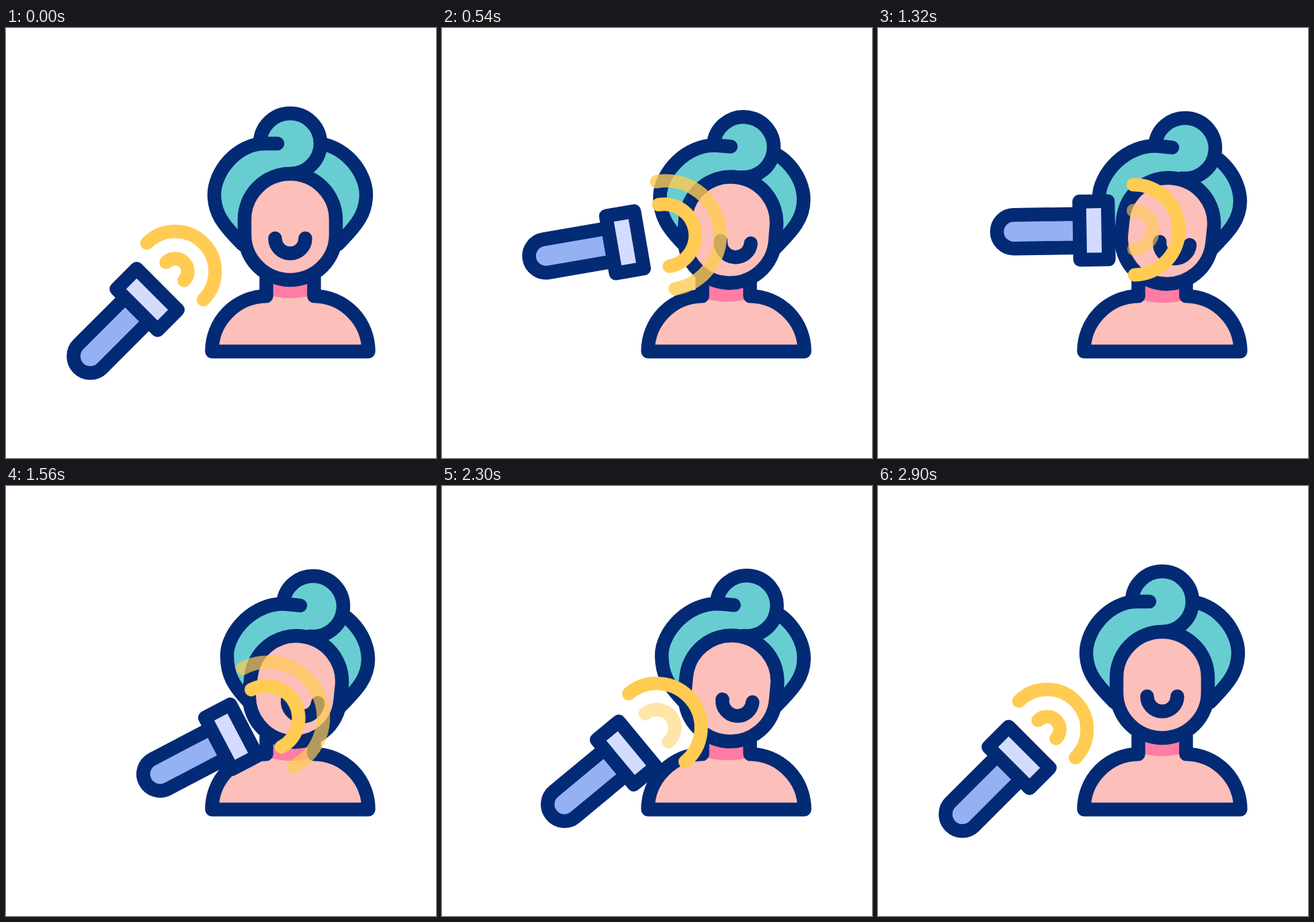
Animation of 640x640 px, one loop 3 s. Source, as an HTML page:

```html
<!DOCTYPE html>
<html lang="en">
<head>
<meta charset="utf-8">
<title>Light therapy</title>
<style>
  html, body { margin: 0; width: 100%; height: 100%; overflow: hidden; background: #fff; }
  svg { display: block; width: 100%; height: 100%; }
  .line { fill: none; stroke: #032a75; stroke-width: 20.5; stroke-linecap: round; stroke-linejoin: round; }
  .skin { fill: #fdbfba; }
  .teal { fill: #68cdd1; }
  .wave { fill: none; stroke: #ffcb52; stroke-width: 20; stroke-linecap: round; }
</style>
</head>
<body>
<svg viewBox="0 0 640 640">
  <g id="body">
    <path class="skin" d="M306.5 481.5A82 82 0 0 1 387.5 399V365H458.5V399A82 82 0 0 1 539.5 481.5Z"/>
    <path id="shade" fill="#ff7ca4" d="M388 362H458V397Q423 407 388 397Z"/>
    <path class="line" d="M387.5 372V399A82 82 0 0 0 306.5 481.5H539.5A82 82 0 0 0 458.5 399V372"/>
  </g>
  <g id="head">
    <path id="backFill" class="teal"/>
    <path id="back" class="line"/>
    <path id="frontFill" class="teal"/>
    <circle id="bunFill" class="teal" cx="423" cy="172" r="45"/>
    <path id="bun" class="line" d="M378 172A45 45 0 1 1 423 217"/>
    <path id="front" class="line"/>
    <path id="face" class="line" style="fill:#fdbfba" d="M355 285a68 68 0 0 1 136 0v22a68 68 0 0 1 -136 0z"/>
    <path id="mouth" class="line" d="M400.5 313A22.5 22.5 0 0 0 445.5 313"/>
  </g>
  <g id="wand">
    <path class="line" style="fill:#94b1f4" d="M-21 -25H-119.5A25 25 0 0 0 -119.5 25H-21Z"/>
    <rect class="line" style="fill:#d3dcff" x="-21.3" y="-43.3" width="42.6" height="86.6"/>
    <path id="outer" class="wave"/>
    <path id="inner" class="wave"/>
  </g>
</svg>
<script>
const LOOP = 3000, BEAT = 500, START = 200, STOP = 2700;
const MID = 423, TILT = 6;
const el = id => document.getElementById(id);
const clamp = v => Math.min(1, Math.max(0, v));
const ease = (t, from, length) => {
  const p = clamp((t - from) / length);
  return p * p * (3 - 2 * p);
};

// One side of the towel (side -1 left, 1 right); the near side widens as the head turns
function drawLobe(id, side, p) {
  const slope = Math.tan(TILT * Math.PI / 180) * p;
  const drop = (7 + 3 * side) * p;
  const topX = MID + 37 * side + (24 - 10 * side) * p, topY = 172 + drop;
  const edgeX = MID + 113 * side + (11 - 8 * side) * p, edgeY = 248 + drop;
  const tipX = MID + 71 * side + (7 - 7 * side) * p, tipY = 322 + drop;
  const along = d => `${topX + d} ${topY + d * slope}`;
  const d = `M${along(-18 * side)}L${along(0)}` +
    `C${along(0.56 * (edgeX - topX))} ${edgeX} ${edgeY - 34} ${edgeX} ${edgeY}` +
    `C${edgeX} ${edgeY + 27} ${tipX + 30 * side} ${tipY - 30} ${tipX} ${tipY}`;
  el(id).setAttribute("d", d);
  el(id + "Fill").setAttribute("d", `${d}L${MID} 300L${MID + 32 * p} ${200 + 10 * p}Z`);
}

// Shift by (dx, dy) and tilt around (MID, cy), scaled by p
function turn(id, p, dx, dy, cy) {
  el(id).setAttribute("transform", `translate(${dx * p} ${dy * p}) rotate(${TILT * p} ${MID} ${cy})`);
}

function drawHead(t) {
  const p = ease(t, START, 500) - ease(t, 2200, 500);
  drawLobe("front", -1, p);
  drawLobe("back", 1, p);
  turn("bun", p, 34, 7, 172);
  turn("bunFill", p, 34, 7, 172);
  turn("face", p, 8, 6, 296);
  turn("mouth", p, 18.7, 7.5, 313);
  el("shade").setAttribute("transform", `translate(${2 * p} ${7 * p})`);
}

const HOME = { x: 210, y: 404, a: -45 };
const HIGH = { x: 314, y: 262, a: 13.7 };
const LOW = { x: 338.5, y: 391, a: -34.3 };

function drawWand(t) {
  const up = ease(t, START, 600), down = ease(t, 1100, 600), back = ease(t, 2000, 600);
  const at = k => HOME[k] * (1 - up + back) + HIGH[k] * (up - down) + LOW[k] * (down - back);
  el("wand").setAttribute("transform", `translate(${at("x")} ${at("y")}) rotate(${at("a")})`);
}

function arc(id, x, r, alpha) {
  el(id).setAttribute("d", `M${x} ${-r}A${r} ${r} 0 0 1 ${x} ${r}`);
  el(id).setAttribute("opacity", clamp(alpha));
}

// Each beat the inner ring grows into the outer one, which spreads and fades
function drawWaves(t) {
  const on = t >= START && t < STOP;
  const u = on ? (t - START) % BEAT / BEAT : 0;
  const fresh = t < START + BEAT ? 1 : on ? u / 0.4 : (t - STOP) / 200;
  arc("inner", 59, 19 + 40.5 * u, fresh);
  arc("outer", 59 + 6 * u * u, 59.5 + 31.5 * u, (1 - u) / 0.4);
}

function draw(now) {
  const t = now % LOOP;
  drawHead(t);
  drawWand(t);
  drawWaves(t);
}

let begin;
function tick(now) {
  begin ??= now;
  draw(now - begin);
  requestAnimationFrame(tick);
}
draw(0);
requestAnimationFrame(tick);
</script>
</body>
</html>
```
